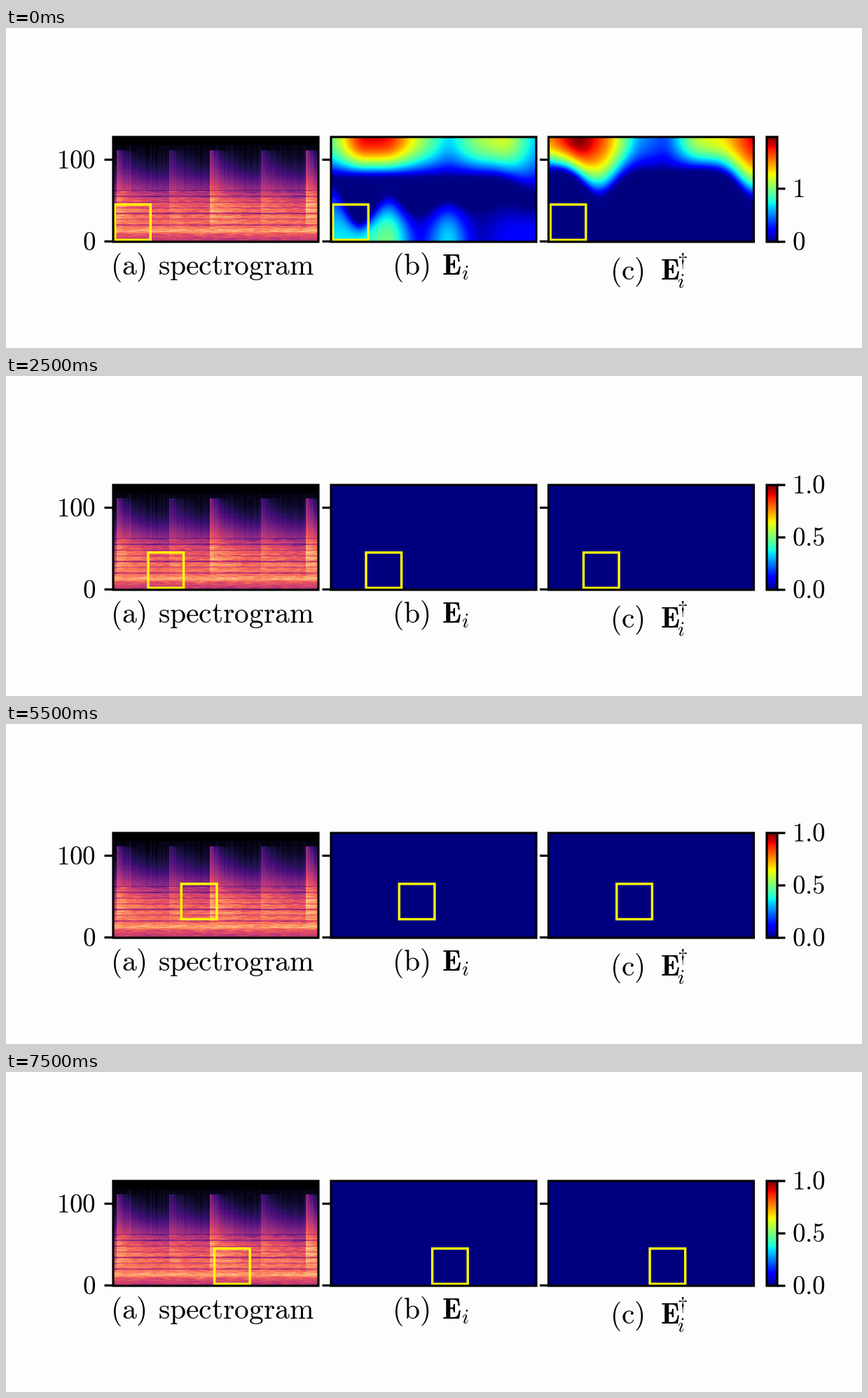
Write a matplotlib script that moves like this. It is 1222x458 px and loops after 8 s.

```python
import numpy as np
import matplotlib.pyplot as plt
from matplotlib.animation import FuncAnimation
from matplotlib.patches import Rectangle

W, H, DPI = 1222, 458, 100
PX = 72 / DPI                      # points per pixel
TOP, BOTTOM, PANEL_W = 156, 306, 293
PANEL_X = (153, 464, 774.5)
ROWS, STEP_X, STEP_Y, BOX = 5, 47.3, 23.9, 50.6
ACTIVE = (0, 4)                    # steps whose maps are not empty
LABEL, SCRIPT, NUMBER = 41.5, 28.9, 37

plt.rcParams["mathtext.fontset"] = "cm"


def bell(x, centre, spread):
    return np.exp(-((x - centre) / spread) ** 2 / 2)


def curve(*keys):
    """Smooth curve across a panel through evenly spaced values."""
    pad, window = 20, np.hanning(41)
    at = np.linspace(0, PANEL_W - 1, len(keys))
    line = np.interp(np.arange(PANEL_W), at, keys)
    return np.convolve(np.pad(line, pad, "edge"), window / window.sum(), "valid")


def glow(strength, reach):
    """Field that fades from one edge, reaching zero at the given depth."""
    y = np.arange(BOTTOM - TOP)[:, None]
    fall = 1 - (y / reach) ** 2
    return strength * (fall + np.sqrt(fall ** 2 + .01)) / 2


def heatmaps():
    x = np.arange(PANEL_W)
    upper = glow(curve(.45, .92, .9, .57, .31, .54, .62, .3), 56 + 20 * bell(x, 293, 25))
    lower = glow(curve(.36, .36, .52, .08, .38, .04, .12, .13),
                 50 + 32 * np.cos(x * np.pi / 42) * np.exp(-x / 120))
    inverse = glow(curve(.74, 1.04, .78, .28, .17, .58, .66, .94),
                   47 + 37 * bell(x, 72, 22) + 41 * bell(x, 293, 22))
    return [np.clip(field, 0, 1) for field in (upper + lower[::-1], inverse)]


def smooth(a, n, axis):
    return np.apply_along_axis(np.convolve, axis, a, np.ones(n) / n, mode="same")


def spectrogram():
    rng = np.random.default_rng(4)
    f, t = np.mgrid[0:128, 0:250].astype(float)
    level = .66 / (1 + (f / 66) ** 5) - .14 * bell(f, 0, 5) + .16 * bell(f, 13, 2)
    # Struck notes: sharp start, high frequencies die away first
    hits = 0
    for start, strength in ((4, .9), (68, .6), (118, 1.05), (180, .7), (235, 1.15)):
        decay = np.exp(-np.abs(t - start) / np.maximum(58 - .45 * f, 7))
        hits = np.maximum(hits, strength * decay * (t >= start))
    level += .32 * np.sqrt(np.clip((f - 15) / 60, 0, 1)) * hits * (f < 112)
    # Dark gaps between the harmonics, one of them deeper
    gaps = np.clip(np.cos((f - 20) * 2 * np.pi / 7), 0, 1) ** 4
    level -= .17 * gaps * ((f > 17) & (f < 64)) + .18 * bell(f, 34, 1)
    grain = rng.normal(size=f.shape)
    columns = rng.normal(size=(1, 250))
    level += np.where(f < 62, .1 * smooth(grain, 9, 1), .018 * columns + .012 * grain)
    return np.clip(level, 0, 1) * (f < 118)


fig = plt.figure(figsize=(W / DPI, H / DPI), dpi=DPI, facecolor="#fdfdfc")
ax = fig.add_axes([0, 0, 1, 1])
ax.axis("off")


def picture(data, x, width, cmap, **kw):
    return ax.imshow(data, cmap=cmap, vmin=0, vmax=1, aspect="auto",
                     extent=(x, x + width, BOTTOM, TOP), **kw)


def outline(x, y, width, height, color, lw, zorder):
    return ax.add_patch(Rectangle((x, y), width, height, fill=False, ec=color, lw=lw * PX,
                                  joinstyle="miter", snap=False, zorder=zorder))


def frame(x, width):
    outline(x, TOP, width, BOTTOM - TOP, "black", 3.2, 5)


def tick(x0, x1, y):
    return ax.plot([x0, x1], [y, y], color="black", lw=3.2 * PX,
                   solid_capstyle="butt", snap=False, zorder=5)[0]


def tex(x, y, body, size=LABEL):
    return ax.text(x, y, f"${body}$", fontsize=size * PX, va="baseline", ha="left")


def number(x, y, s):
    return tex(x, y + 12.4, rf"\mathrm{{{s}}}", NUMBER)


def scale(*marks):
    parts = []
    for y, s in marks:
        parts += [tick(1101, 1112.5, y), number(1122, y, s)]
    return parts


def caption(x, y, letter):
    tex(x, y, rf"\mathrm{{({letter})}}")
    tex(x + 71.5, y, r"\mathbf{E}")


picture(spectrogram(), PANEL_X[0], PANEL_W, "magma", origin="lower",
        interpolation="nearest")
fields = heatmaps()
maps = [picture(field, x, PANEL_W, "jet", interpolation="bilinear")
        for field, x in zip(fields, PANEL_X[1:])]
picture(np.linspace(1, 0, 256)[:, None], 1086, 15, "jet", interpolation="nearest")

for x in PANEL_X:
    frame(x, PANEL_W)
    for y in (188.5, 305.5):
        tick(x - 12.5, x, y)
frame(1086, 15)
boxes = [outline(x, TOP, BOX, BOX, "yellow", 3.4, 4) for x in PANEL_X]

number(72.5, 188.5, "100")
number(109, 305.5, "0")
scale_active = scale((230, "1"), (306, "0"))
scale_empty = scale((156, "1.0"), (231, "0.5"), (306, "0.0"))

tex(149, 353, r"\mathrm{(a)}")
tex(217, 353, r"\mathrm{spectrogram}")
caption(551, 353, "b")
tex(650.5, 360, "i", SCRIPT)
caption(862.5, 360, "c")
tex(958, 341, r"\dagger", SCRIPT)
tex(958, 372, "i", SCRIPT)

ax.set_xlim(0, W)
ax.set_ylim(H, 0)


def update(i):
    col, row = divmod(i, ROWS)
    for box, x in zip(boxes, PANEL_X):
        box.set_xy((x + 2.7 + col * STEP_X, 252.7 - row * STEP_Y))
    active = i in ACTIVE
    for image, field in zip(maps, fields):
        image.set_data(field * active)
    for part in scale_active:
        part.set_visible(active)
    for part in scale_empty:
        part.set_visible(not active)
    return boxes + maps + scale_active + scale_empty


anim = FuncAnimation(fig, update, frames=16, interval=500, repeat=True,
                     repeat_delay=0, blit=False)
plt.show()
```
